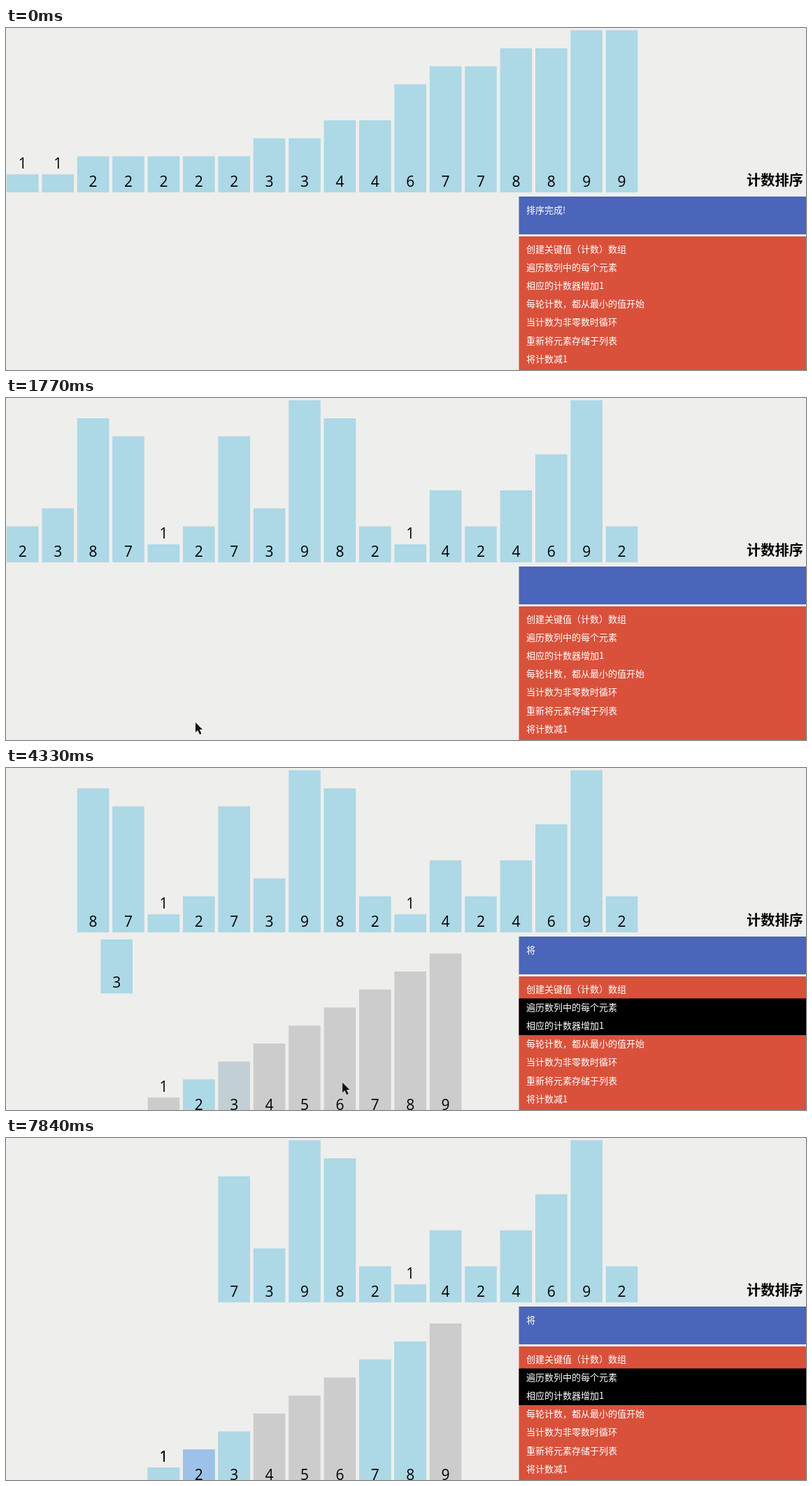
These frames come from a looping animation (1144 by 489 pixels, 8000 ms). An HTML page with a canvas:

```html
<!DOCTYPE html>
<html lang="zh-CN">
<head>
<meta charset="utf-8">
<style>
  html, body { margin: 0; width: 100%; height: 100%; overflow: hidden; background: #eeeeec; }
  canvas { display: block; }
</style>
</head>
<body>
<canvas id="stage" width="1144" height="489"></canvas>
<script>
const ctx = document.getElementById('stage').getContext('2d');

const LOOP = 8000, TICK = 77.8, FIRST_TICK = 910, MOVE = 250;
const SHUFFLE = 870, BUILD = 2565, COUNT = 3382, COUNT_STEP = 842;
const LEFT = 1, PITCH = 50.4, BAR = 45.6, UNIT = 25.75, BASE = 235, DROP = 262;
const BLACK = [0, 0, 0], GRAY = [204, 204, 204], BLUE = [173, 216, 230], DEEP = [157, 194, 233];
const CJK = '"Noto Sans CJK SC", "Noto Sans CJK", sans-serif';

const values = [2, 3, 8, 7, 1, 2, 7, 3, 9, 8, 2, 1, 4, 2, 4, 6, 9, 2];
const order = values.map((_, i) => i).sort((a, b) => values[a] - values[b] || a - b);
const steps = [
  '创建关键值（计数）数组',
  '遍历数列中的每个元素',
  '相应的计数器增加1',
  '每轮计数，都从最小的值开始',
  '当计数为非零数时循环',
  '重新将元素存储于列表',
  '将计数减1'
];

// Pointer path: time, x, y
const pointerPath = [
  [1630, 264, 492], [1921, 279, 432], [2085, 280, 432], [2388, 298, 415],
  [4130, 298, 415], [4333, 481, 450], [4800, 945, 470], [4900, 945, 470], [5344, 956, 492]
];

const lerp = (a, b, p) => a + (b - a) * p;
const mix = (a, b, p) => a.map((c, i) => lerp(c, b[i], p));
const rgb = c => `rgb(${c.map(Math.round).join(',')})`;
const slotX = i => LEFT + PITCH * i;

function progress(time, start) {
  const u = Math.min(1, Math.max(0, (time - start) / MOVE));
  return u < 0.5 ? 4 * u ** 3 : 1 - 4 * (1 - u) ** 3;
}

function rect(x, y, w, h, color) {
  ctx.fillStyle = color;
  ctx.fillRect(x, y, w, h);
}

function text(str, x, y, font, color, align = 'left') {
  ctx.font = font;
  ctx.fillStyle = color;
  ctx.textAlign = align;
  ctx.fillText(str, x, y);
}

function bar(value, x, base, color, grow = 1) {
  const h = UNIT * value;
  rect(x, base - h, BAR * grow, h * grow, rgb(color));
  const baseline = base - (value === 1 ? 33.7 : 8);
  text(value, x + BAR / 2, baseline, '21px "Open Sans", "Noto Sans", sans-serif', '#000', 'center');
}

function drawList(time) {
  const shuffled = progress(time, SHUFFLE);
  values.forEach((value, i) => {
    const x = lerp(slotX(order.indexOf(i)), slotX(i), shuffled);
    const fall = progress(time, COUNT + COUNT_STEP * i);
    bar(value, lerp(x, slotX(3 + value), fall), BASE + DROP * fall, BLUE);
  });
}

function drawCounters(time) {
  if (time < BUILD) return;
  const built = progress(time, BUILD);
  for (let v = 1; v <= 9; v++) {
    let color = mix(BLACK, GRAY, built), seen = 0;
    values.forEach((value, i) => {
      const start = COUNT + COUNT_STEP * i;
      if (value === v && time >= start) color = mix(color, seen++ ? DEEP : BLUE, progress(time, start));
    });
    bar(v, slotX(3 + v), BASE + DROP, color, built);
  }
}

function drawPanel(time) {
  let status = '';
  if (time < SHUFFLE) status = '排序完成!';
  else if (time >= COUNT) status = '将';
  else if (time >= BUILD) status = '创建一个关键值（计数）数组（从1到9）.';

  const left = 733.5, width = 1144 - left;
  text('计数排序', 1140, 224.5, 'bold 20.25px ' + CJK, '#000', 'right');
  rect(left, 241, width, 54, '#4b65ba');
  rect(left, 298, width, 191, '#d9513b');
  if (time >= COUNT) rect(left, 329.5, width, 52.5, '#000');
  else if (time >= BUILD) rect(left, 298, width, 31.5, '#000');
  text(status, 744, 264.5, '500 13px ' + CJK, '#fff');
  steps.forEach((line, i) => text(line, 744, 320.5 + 26.2 * i, '13px ' + CJK, '#fff'));
}

function drawPointer(time) {
  const next = pointerPath.findIndex(k => k[0] > time);
  if (next < 1) return;
  const [t0, x0, y0] = pointerPath[next - 1], [t1, x1, y1] = pointerPath[next];
  const p = (time - t0) / (t1 - t0);
  ctx.save();
  ctx.translate(lerp(x0, x1, p), lerp(y0, y1, p));
  ctx.fillStyle = '#111';
  ctx.fill(new Path2D('M0 0V14L3.2 11L6 17L8.4 16L5.8 10H10Z'));
  ctx.restore();
}

function frame(now) {
  const t = now % LOOP;
  const time = FIRST_TICK + TICK * Math.floor((t - FIRST_TICK) / TICK + 0.15);
  rect(0, 0, 1144, 489, '#eeeeec');
  drawList(time);
  drawCounters(time);
  drawPanel(time);
  drawPointer(time);
  requestAnimationFrame(frame);
}
requestAnimationFrame(frame);
</script>
</body>
</html>
```
